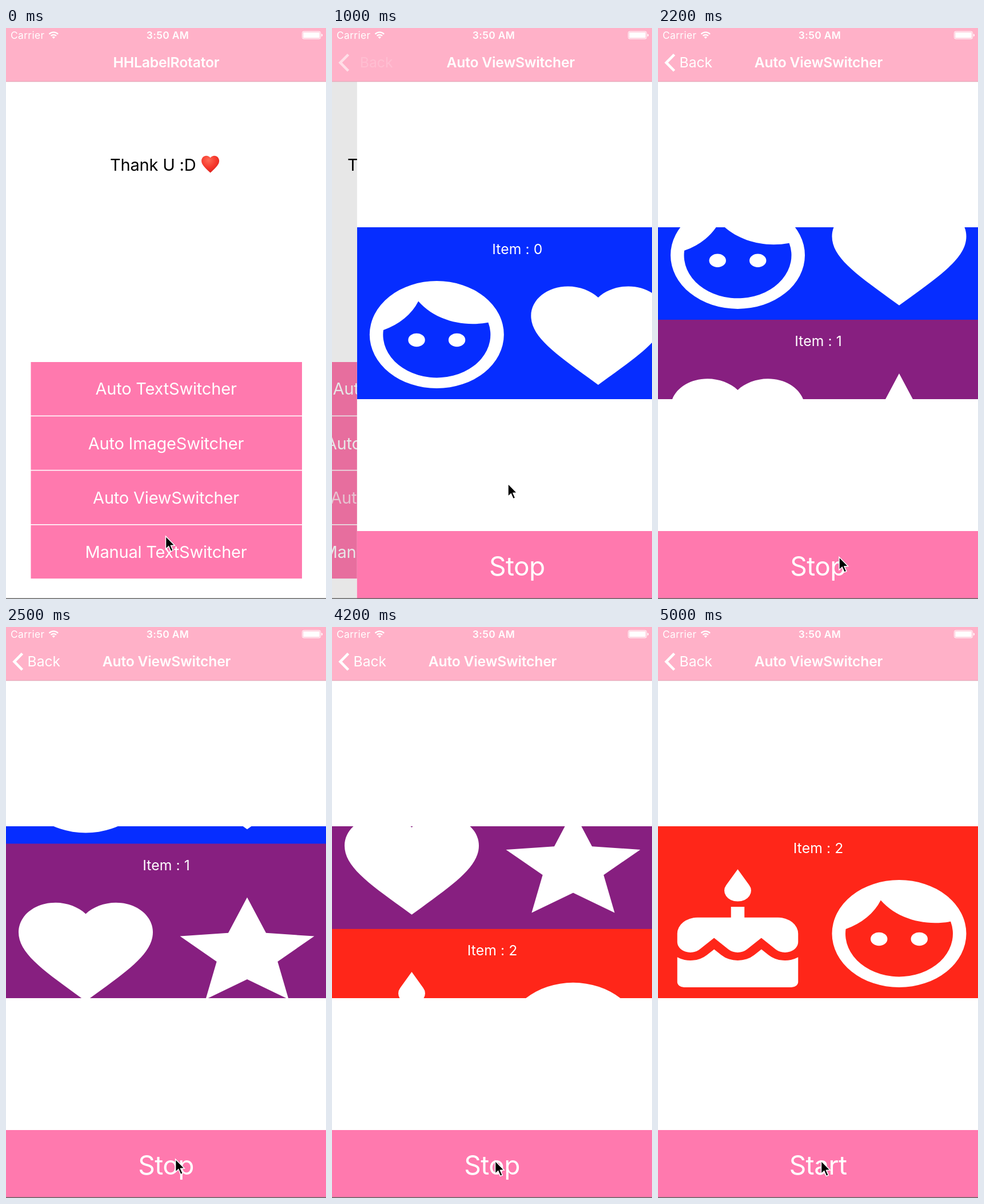
Recreate the animation shown at these times as an HTML page. Size 560 by 1000 pixels, loop 5100 ms.

```html
<!DOCTYPE html>
<html lang="en">
<head>
<meta charset="utf-8">
<title>View switcher demo</title>
<style>
  html, body { margin: 0; width: 100%; height: 100%; overflow: hidden; background: #fff; }
  svg { display: block; width: 100%; height: 100%; }
  text { font-family: Inter, Roboto, sans-serif; fill: #fff; white-space: pre; }
  .mid { text-anchor: middle; }
  .status { font-size: 17.4px; letter-spacing: .35px; }
  .nav { font-size: 24.7px; }
  .bold { font-weight: 600; letter-spacing: -.2px; }
  .label { font-size: 29px; letter-spacing: -.2px; }
  .item { font-size: 24.7px; letter-spacing: .1px; }
  .big { font-size: 46px; letter-spacing: -.6px; }
</style>
</head>
<body>
<svg viewBox="0 0 560 1000" preserveAspectRatio="none">
  <defs>
    <clipPath id="window"><rect y="349" width="560" height="301"/></clipPath>
    <radialGradient id="red" cx=".4" cy=".25" r=".8">
      <stop offset="0" stop-color="#ff6a55"/>
      <stop offset=".55" stop-color="#f5382c"/>
      <stop offset="1" stop-color="#d81f1c"/>
    </radialGradient>
    <path id="heart" d="M12 21.35l-1.45-1.32C5.4 15.36 2 12.28 2 8.5 2 5.42 4.42 3 7.5 3c1.74 0 3.41.81 4.5 2.09C13.09 3.81 14.76 3 16.5 3 19.58 3 22 5.42 22 8.5c0 3.78-3.4 6.86-8.55 11.54z"/>
    <path id="star" d="M12 17.27L18.18 21l-1.64-7.03L22 9.24l-7.19-.61L12 2 9.19 8.63 2 9.24l5.46 4.73L5.82 21z"/>
    <g id="face">
      <path fill-rule="evenodd" d="M2 12a10 10 0 0 1 20 0a10 10 0 0 1-20 0zM4.05 11.14A8 8 0 1 0 19.67 9.74C15.5 10.7 11.5 9 9.26 5.77A9.9 9.9 0 0 1 4.05 11.14z"/>
      <circle cx="9" cy="13" r="1.25"/><circle cx="15" cy="13" r="1.25"/>
    </g>
    <g id="cake">
      <path d="M12 6a2 2 0 0 0 1.71-3.03L12 0l-1.71 2.97A2 2 0 0 0 12 6z"/>
      <path d="M18 9h-5V7h-2v2H6a3 3 0 0 0-3 3v1.54a1.96 1.96 0 0 0 3.34 1.39l2.14-2.13 2.13 2.13a1.96 1.96 0 0 0 2.77 0l2.14-2.13 2.13 2.13A1.96 1.96 0 0 0 21 13.54V12a3 3 0 0 0-3-3z"/>
      <path d="M16.6 15.99l-1.07-1.07-1.08 1.07a3.46 3.46 0 0 1-4.89 0l-1.07-1.07-1.09 1.07A3.46 3.46 0 0 1 3 16.39V21a1 1 0 0 0 1 1h16a1 1 0 0 0 1-1v-4.61a3.46 3.46 0 0 1-4.4-.4z"/>
    </g>
  </defs>

  <rect width="560" height="1000" fill="#fff"/>
  <g id="home">
    <rect width="560" height="1000" fill="#fff"/>
    <text x="182" y="250" class="label" style="fill:#000">Thank U :D</text>
    <use href="#heart" fill="url(#red)" transform="translate(339 219) scale(1.55 1.62)"/>
    <g id="menu"></g>
  </g>
  <rect id="shade" y="94" width="560" height="906" fill="#000"/>

  <g id="page">
    <rect width="560" height="1000" fill="#fff"/>
    <g clip-path="url(#window)"><g id="reel"></g></g>
    <rect y="881" width="560" height="119" fill="#ff79ae"/>
    <text id="toggle" x="280" y="959" class="big mid">Stop</text>
  </g>

  <rect width="560" height="94" fill="#ffb1c8"/>
  <rect y="93.3" width="560" height="1" fill="#dda5b5"/>
  <text x="8" y="19" class="status">Carrier</text>
  <text x="283" y="19" class="status mid" font-weight="600">3:50 AM</text>
  <g fill="none" stroke="#fff" stroke-width="2.3">
    <path d="M75.5 10.7a11 11 0 0 1 15.6 0M78.6 13.8a6.6 6.6 0 0 1 9.4 0"/>
    <path d="M83.3 18.8l-2.6-2.7a3.7 3.7 0 0 1 5.2 0z" fill="#fff" stroke="none"/>
    <rect x="518.5" y="6" width="32" height="13" rx="2.5" stroke-width="1"/>
    <path d="M520 7.5h29v10h-29zM552 10q2 .5 2 2.5t-2 2.5z" fill="#fff" stroke="none"/>
  </g>
  <text id="homeTitle" x="280.5" y="69" class="nav bold mid">HHLabelRotator</text>
  <text id="pageTitle" x="281" y="69" class="nav bold mid">Auto ViewSwitcher</text>
  <path id="chevron" d="M28.5 46.5L14.5 60.7L28.5 75" fill="none" stroke="#fff" stroke-width="4.6"/>
  <text id="back" x="37.5" y="69" class="nav">Back</text>

  <rect y="998.5" width="560" height="1.5" fill="#666"/>
  <path id="cursor" d="M0 0V22.5L5.2 17.8L9 26.6L12.8 25L9 16.4L15.6 16z" fill="#000" stroke="#fff" stroke-width="1.5"/>
</svg>
<script>
const LOOP = 5100, STEP = 100;
const $ = id => document.getElementById(id);
const clamp = v => Math.max(0, Math.min(1, v));
const ramp = (t, from, to) => clamp((t - from) / (to - from));
const move = (id, x, y = 0) => $(id).setAttribute('transform', `translate(${x} ${y})`);
const fade = (id, v) => $(id).setAttribute('opacity', v);

$('menu').innerHTML = ['Auto TextSwitcher', 'Auto ImageSwitcher', 'Auto ViewSwitcher', 'Manual TextSwitcher']
  .map((name, i) => `<rect x="43.5" y="${585 + i * 95.2}" width="474.5" height="93.6" fill="#ff79ae"/>
    <text id="choice${i}" x="280" y="${642.3 + i * 95.2}" class="label mid">${name}</text>`).join('');

const icon = (name, x) =>
  `<use href="#${name}" fill="#fff" transform="translate(${x} 424.2) scale(11.75 9.4)"/>`;
$('reel').innerHTML = [['#062dff', 'face', 'heart'], ['#871f80', 'heart', 'star'], ['#ff2619', 'cake', 'face']]
  .map(([color, left, right], i) => `<g transform="translate(0 ${i * 301})">
    <rect y="349" width="560" height="302" fill="${color}"/>
    <text x="280.5" y="395.5" class="item mid">Item : ${i}</text>
    ${icon(left, -1.5)}${icon(right, 281)}</g>`).join('');

// cubic-bezier(.42, 0, .58, 1)
function easeInOut(x) {
  let lo = 0, hi = 1;
  for (let i = 0; i < 24; i++) {
    const s = (lo + hi) / 2, r = 1 - s;
    if (1.26 * s * r * r + 1.74 * s * s * r + s ** 3 < x) lo = s; else hi = s;
  }
  return lo * lo * (3 - 2 * lo);
}

// distance left to travel of a critically damped spring
function springLeft(t, start) {
  const w = Math.max(0, t - start) * .012;
  return (1 + w) * Math.exp(-w);
}

// time, x, y
const cursorPath = [
  [0, 279.5, 890], [300, 298, 832], [500, 307, 802], [700, 308, 798], [1300, 308, 798],
  [1800, 312.5, 905.5], [2200, 317, 926.5], [2700, 285.5, 935], [LOOP, 285.5, 935]
];
function cursorAt(t) {
  const i = cursorPath.findIndex(p => p[0] > t);
  const a = cursorPath[i - 1], b = cursorPath[i];
  const k = ramp(t, a[0], b[0]), s = k * k * (3 - 2 * k);
  return [a[1] + (b[1] - a[1]) * s, a[2] + (b[2] - a[2]) * s];
}

function draw(t) {
  const left = springLeft(t, 650), done = 1 - left;
  move('home', -168 * done);
  fade('shade', .1 * done);
  move('page', 562 * left);
  move('homeTitle', -145 * done);
  fade('homeTitle', clamp(1 - done * 1.3));
  move('pageTitle', 407 * left);
  fade('pageTitle', clamp(done * 1.4));
  move('back', 145 * left);
  fade('back', ramp(t, 960, 1200));
  fade('chevron', ramp(t, 800, 1150));
  fade('choice2', t < 500 ? 1 : .3 + .4 * ramp(t, 650, 1000));

  const turns = easeInOut(ramp(t, 1722, 2722)) + easeInOut(ramp(t, 3757, 4757));
  move('reel', 0, -301 * turns);
  $('toggle').textContent = t < 4800 ? 'Stop' : 'Start';
  fade('toggle', t === 4700 ? .4 : 1);
  move('cursor', ...cursorAt(t));
}

const begin = performance.now();
function tick() {
  const t = (performance.now() - begin) % LOOP;
  draw(Math.floor(t / STEP) * STEP);
  requestAnimationFrame(tick);
}
tick();
</script>
</body>
</html>
```
